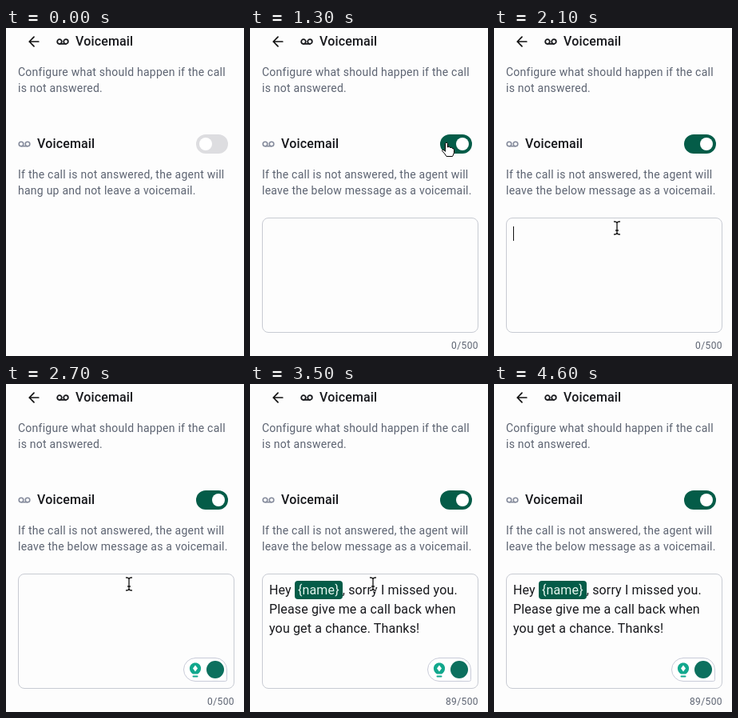
Recreate the animation shown at these times as an HTML page. Size 298 by 410 pixels, loop 4.7 s.

```html
<!DOCTYPE html>
<html lang="en">
<head>
<meta charset="utf-8">
<title>Voicemail settings</title>
<style>
  html, body { margin: 0; width: 100%; height: 100%; overflow: hidden; background: #fdfdfd; }
  #stage {
    position: relative; width: 298px; height: 410px; overflow: hidden;
    background: #fdfdfd; color: #17181c; font: 400 14px/20px Roboto, sans-serif;
  }
  #stage > * { position: absolute; white-space: nowrap; }
  .title { font-size: 16px; font-weight: 500; line-height: 24px; letter-spacing: .15px; }
  .note { left: 15px; color: #5d6472; letter-spacing: .25px; }
  .switch {
    left: 238px; top: 133px; width: 40px; height: 24px; border-radius: 12px;
    background: color-mix(in srgb, #045c48 calc(var(--on) * 100%), #dddde0);
  }
  .switch::after {
    content: ""; position: absolute; left: 4px; top: 4px; width: 16px; height: 16px;
    border-radius: 50%; background: #fff; transform: translateX(calc(var(--on) * 16px));
  }
  .box {
    left: 15px; top: 237px; width: 271px; height: 144px; box-sizing: border-box;
    border: 1px solid #c8cbd3; border-radius: 8px; padding: 8px;
    font-size: 16px; line-height: 24px; letter-spacing: .15px;
  }
  .chip { padding: 2px 4px; border-radius: 4px; background: #045c48; color: #e4f5ee; }
  .caret {
    display: inline-block; width: 1px; height: 18px; margin-right: -1px;
    vertical-align: -3px; background: #111;
  }
  .count { right: 12px; top: 387px; font-size: 12px; letter-spacing: .4px; color: #5d6472; }
  svg { overflow: visible; fill: none; stroke-linecap: round; stroke-linejoin: round; }
  .layer { left: 0; top: 0; }
</style>
</head>
<body>
<div id="stage">
  <svg class="layer" width="298" height="410">
    <defs>
      <g id="reels">
        <circle cx="-4" r="2.8"/><circle cx="4" r="2.8"/><path d="M-4 2.8H4"/>
      </g>
    </defs>
    <path d="M35 11.2L29.2 17L35 22.8M29.2 17H40.8" stroke="#111" stroke-width="1.7"/>
    <use href="#reels" transform="translate(71 17)" stroke="#17181c" stroke-width="1.8"/>
    <use href="#reels" transform="translate(23 145)" stroke="#858b9c" stroke-width="1.6"/>
  </svg>

  <div class="title" style="left:87px;top:5px">Voicemail</div>
  <div class="note" style="top:45px">Configure what should happen if the call<br>is not answered.</div>
  <div class="title" style="left:39px;top:133px">Voicemail</div>
  <div class="switch" id="toggle"></div>
  <div class="note" style="top:173px">If the call is not answered, the agent will<br><span id="outcome"></span></div>

  <div class="box" id="box"><span id="message">Hey <span class="chip">{name}</span>, sorry I missed you.<br>Please give me a call back when<br>you get a chance. Thanks!</span><span class="caret" id="caret"></span></div>
  <div class="count" id="count"></div>

  <svg class="layer" id="helper" width="298" height="410">
    <path d="M237 342.5H262A14.5 14.5 0 0 1 276.5 357V369.5Q276.5 371.5 274.5 371.5H237A14.5 14.5 0 0 1 237 342.5Z" fill="#fff" stroke="#c8cbd8"/>
    <path d="M234 362.5C227.5 358.5 229 348.5 237 348.5S246.5 358.5 240 362.5Z" fill="#12a88d"/>
    <path d="M234.5 365.5H239.5" stroke="#12a88d" stroke-width="2"/>
    <path d="M237 351.5L240 355.5L237 359.5L234 355.5Z" fill="#fff"/>
    <circle cx="262" cy="357" r="11" fill="#0c705e"/>
    <path id="spin" d="M253.5 357A8.5 8.5 0 0 0 270.5 357" stroke="#fff" stroke-width="1.5"/>
  </svg>

  <svg class="layer" id="cursor" width="1" height="1">
    <path id="arrow" d="M0 0V15.5L3.6 12.2L6 17.6L8.6 16.5L6.2 11.2H11.2Z" fill="#000" stroke="#fff"/>
    <path id="hand" d="M-1.5 9V1.2Q0 -1.2 1.5 1.2V6Q3.5 4.5 4.5 6.5Q6.5 5.5 7.3 7.5Q9.5 7 9.5 9.5V12.5Q9 15 7.5 17.5H0Q-2 14 -5.5 10.5Q-5 8 -1.5 11Z" fill="#fff" stroke="#000"/>
    <g id="beam">
      <path id="stem" d="M-3.5 -8Q0 -8 0 -6Q0 -8 3.5 -8M0 -6V6M-3.5 8Q0 8 0 6Q0 8 3.5 8M-1.5 3H1.5" stroke="#fff" stroke-width="3"/>
      <path d="M-3.5 -8Q0 -8 0 -6Q0 -8 3.5 -8M0 -6V6M-3.5 8Q0 8 0 6Q0 8 3.5 8M-1.5 3H1.5" stroke="#111" stroke-width="1.3"/>
    </g>
  </svg>
</div>

<script>
  const LOOP = 4700, TICK = 100;
  const el = id => document.getElementById(id);
  const show = (id, on) => { el(id).style.visibility = on ? "visible" : "hidden"; };
  const within = (t, from, to) => t >= from && t < to;

  // time, x, y of the pointer
  const path = [
    [500, 22, 92], [600, 66, 140], [700, 128, 167], [900, 231, 149],
    [1000, 246, 143], [1300, 246, 143], [1400, 242, 152], [1600, 230, 173],
    [1800, 197, 217], [2100, 154, 250], [3500, 154, 250],
    [3600, 146, 275], [3800, 115, 370], [3900, 102, 402]
  ];

  function pointAt(t) {
    const i = path.findIndex(p => p[0] > t);
    if (i < 0) return path.at(-1).slice(1);
    const [t0, x0, y0] = path[Math.max(i - 1, 0)], [t1, x1, y1] = path[i];
    const k = Math.max(0, (t - t0) / (t1 - t0));
    return [x0 + (x1 - x0) * k, y0 + (y1 - y0) * k];
  }

  function pointerKind(t) {
    if (!within(t, 500, 4000)) return "";
    if (within(t, 1000, 1500)) return "hand";
    return within(t, 1500, 3800) ? "beam" : "arrow";
  }

  function draw(t) {
    const active = t >= 1200, filled = t >= 2800;
    const on = Math.min(1, Math.max(0, (t - 1100) / 200));
    el("toggle").style.setProperty("--on", on);
    el("outcome").textContent = active
      ? "leave the below message as a voicemail."
      : "hang up and not leave a voicemail.";
    show("box", active);
    show("count", active);
    el("count").textContent = filled ? "89/500" : "0/500";
    el("message").style.display = filled ? "" : "none";
    show("caret", within(t, 2100, 2600) || within(t, 2800, 3400) || within(t, 3900, 4400));
    show("helper", t >= 2200);
    show("spin", within(t, 3600, 4300));
    el("spin").setAttribute("transform", `rotate(${(t - 4000) * 0.45} 262 357)`);

    const [x, y] = pointAt(t), kind = pointerKind(t);
    el("cursor").style.transform = `translate(${x}px, ${y}px)`;
    for (const id of ["arrow", "hand", "beam"]) show(id, id === kind);
  }

  let start;
  function frame(now) {
    start ??= now;
    draw(Math.floor((now - start) % LOOP / TICK) * TICK);
    requestAnimationFrame(frame);
  }
  draw(0);
  requestAnimationFrame(frame);
</script>
</body>
</html>
```
